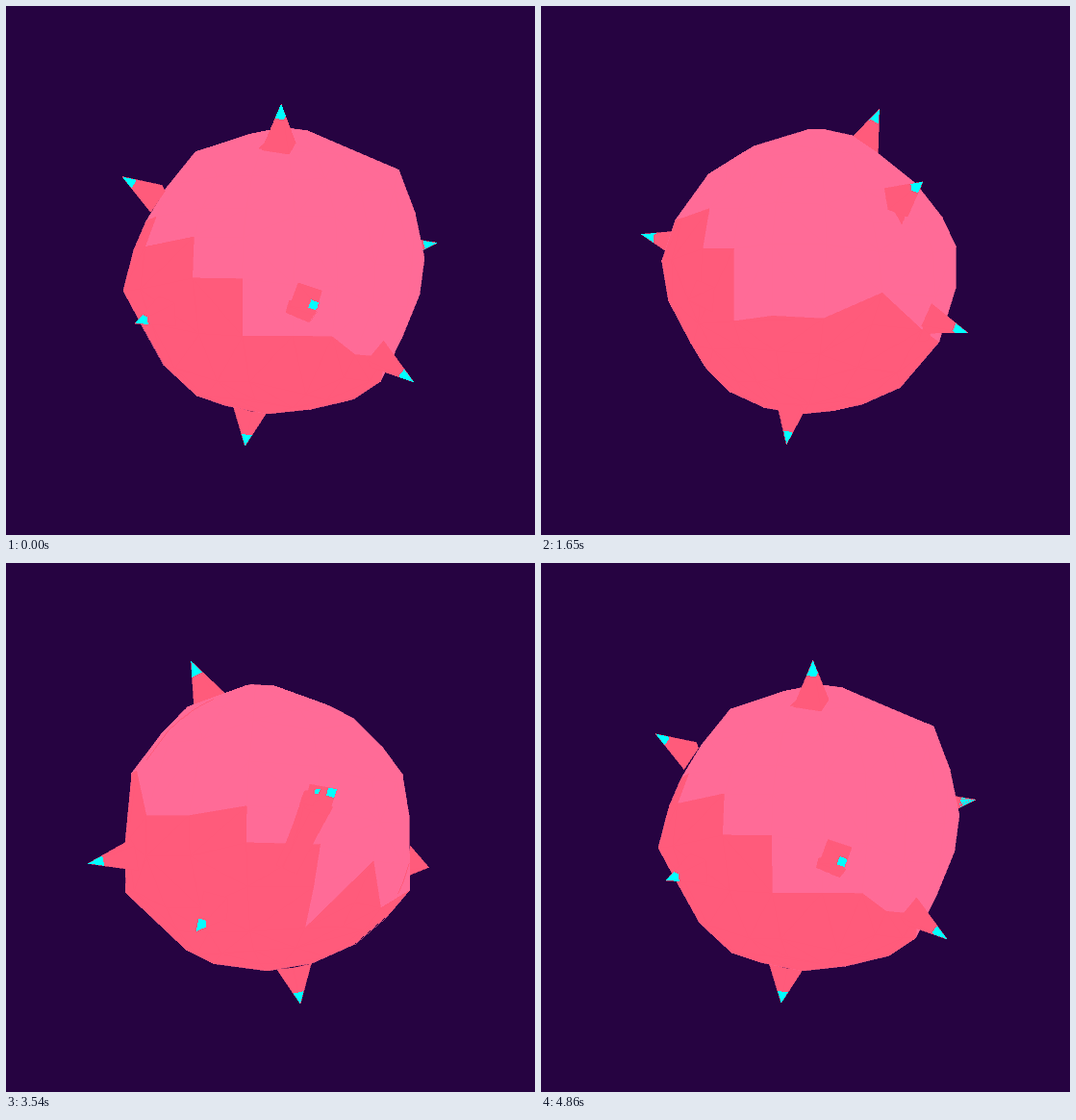
These frames come from a looping animation (550x550 px, 4890 ms). An HTML page:

```html
<!DOCTYPE html>
<html lang="en">
<head>
<meta charset="utf-8">
<title>Spiky ball</title>
<style>
html, body { margin: 0; width: 100%; height: 100%; overflow: hidden; background: #260341; }
svg { display: block; width: 100vw; height: 100vh; shape-rendering: crispEdges; }
.lit { fill: #ff6b97; stroke: #ff6b97; stroke-width: .6; }
.dark { fill: #ff5b7b; stroke: #ff5b7b; stroke-width: .6; }
.cap { fill: #0ff; }
</style>
</head>
<body>
<svg viewBox="0 0 550 550">
  <clipPath id="ball"><path id="clip"/></clipPath>
  <g id="back"></g>
  <path id="body" class="lit"/>
  <g clip-path="url(#ball)"><path id="shade" class="dark"/><path id="cast" class="dark"/></g>
  <g id="front"></g>
</svg>
<script>
const LOOP = 4890, STEP = 30, CX = 275.5, CY = 277;
const ROLL = .026, PITCH = .03, RAD = 148, BASE = 145;
const $ = id => document.getElementById(id);

const dot = (a, b) => a[0] * b[0] + a[1] * b[1] + a[2] * b[2];
const cross = (a, b) => [a[1] * b[2] - a[2] * b[1], a[2] * b[0] - a[0] * b[2], a[0] * b[1] - a[1] * b[0]];
const add = (a, b, k = 1) => a.map((v, i) => v + b[i] * k);
const mul = (a, k) => a.map(v => v * k);
const unit = a => mul(a, 1 / Math.hypot(...a));
const mix = (a, b, k) => a.map((v, i) => v + (b[i] - v) * k);
const normal = (a, b, c) => cross(add(b, a, -1), add(c, a, -1));
const polar = (deg, rho, h) => {
  const f = deg * Math.PI / 180;
  return [rho * Math.sin(f), h, rho * Math.cos(f)];
};
const LIGHT = unit([.5, 1, .24]);

// Outlines of the ball: azimuth, then pairs of distance from axis and height
const ribs = [
  [-170.6, 51,132, 82,118, 114,88, 135,61, 143,19, 146,-59, 125,-85, 90,-117, 46,-138],
  [-136.4, 29,138, 71,122, 104,95, 128,68, 140,25, 131,-50, 113,-86, 94,-113, 46,-135],
  [-90, 82,123, 111,85, 131,50, 143,20, 153,-23, 134,-56, 108,-100, 74,-130],
  [-31.5, 46,142, 112,95, 140,61, 155,31, 156,-12, 140,-69, 101,-117, 65,-134],
  [9.4, 25,148, 92,123, 118,93, 146,55, 151,-17, 149,-70, 85,-123, 57,-137],
  [43.6, 37,148, 97,122, 132,85, 157,8, 156,-34, 130,-86, 113,-110, 89,-133],
  [90, 81,127, 130,110, 148,66, 159,19, 155,-19, 138,-64, 117,-110, 90,-129, 45,-141],
  [148.5, 60,128, 88,109, 122,69, 137,51, 150,8, 142,-33, 118,-76, 102,-101, 64,-130]
].map(([az, ...v]) => {
  const pts = [[0, 149]];
  for (let i = 0; i < v.length; i += 2) pts.push([v[i], v[i + 1]]);
  pts.push([0, -147]);
  return { az, pts: pts.map(([rho, h]) => ({ rho, h, ang: Math.atan2(rho, h), r: Math.hypot(rho, h) })) };
});

function radiusAt(rib, ang) {
  const i = Math.max(1, rib.pts.findIndex(p => p.ang >= ang));
  const a = rib.pts[i - 1], b = rib.pts[i];
  return a.r + (b.r - a.r) * (ang - a.ang) / (b.ang - a.ang);
}

function ballPoints() {
  const out = [[0, 149, 0], [0, -147, 0]];
  ribs.forEach((rib, i) => {
    const next = ribs[(i + 1) % ribs.length];
    const gap = (next.az - rib.az + 360) % 360;
    for (const p of rib.pts.slice(1, -1)) {
      const r = (p.r + radiusAt(next, p.ang)) / 2 * 1.008;
      out.push(polar(rib.az, p.rho, p.h));
      out.push(polar(rib.az + gap / 2, r * Math.sin(p.ang), r * Math.cos(p.ang)));
    }
  });
  // Spread the order so that the first points are not in one plane
  const rank = i => (i * .618034) % 1;
  return out.map((p, i) => [rank(i), p]).sort((a, b) => a[0] - b[0]).map(e => e[1]);
}

function hull(pts) {
  let faces = [[0, 1, 2], [0, 2, 1]];
  for (let i = 3; i < pts.length; i++) {
    const keep = [], edges = new Map();
    for (const f of faces) {
      const [a, b, c] = f;
      const n = normal(pts[a], pts[b], pts[c]);
      if (dot(n, add(pts[i], pts[a], -1)) > 1e-6) {
        [[a, b], [b, c], [c, a]].forEach(e => edges.set(e.join(), e));
      } else keep.push(f);
    }
    for (const [a, b] of edges.values()) {
      if (!edges.has(b + "," + a)) keep.push([a, b, i]);
    }
    faces = keep;
  }
  return faces;
}

const points = ballPoints(), faces = hull(points);

// azimuth, distance from axis, height, base radius, has cap
const spikes = [
  [4, 88, 173, 21, 1],
  [-74.5, 163, 94, 19, 1],
  [115, 187, 38, 9, 1],
  [119.5, 197, 38, 19, 1],
  [15, 190, -41, 19, 1],
  [-51, 180, -60, 18, 1],
  [71.5, 160, -112, 19, 1],
  [-145, 39, -180, 18, 1],
  [-169, 165, -35, 19, 0]
].map(([az, rho, h, w, cap]) => {
  const tip = polar(az, rho, h), axis = unit(tip);
  const e1 = polar(az + 90, 1, 0), e2 = cross(axis, e1);
  const base = [0, 1, 2, 3].map(k => {
    const f = k * Math.PI / 2 + .5;
    return add(add(mul(axis, BASE), e1, w * Math.cos(f)), e2, w * Math.sin(f));
  });
  const g = document.createElementNS("http://www.w3.org/2000/svg", "g");
  const parts = ["dark", "cap"].map(c => {
    const p = document.createElementNS("http://www.w3.org/2000/svg", "path");
    p.setAttribute("class", c);
    return g.appendChild(p);
  });
  return { tip, base, w, cap, g, parts };
});

const path = list => "M" + list.map(p => (CX + p[0]).toFixed(1) + " " + (CY - p[1]).toFixed(1)).join("L") + "Z";

function viewer(theta) {
  const c = Math.cos(theta), s = Math.sin(theta);
  return ([px, h, pz]) => {
    const x = px * c + pz * s, z = pz * c - px * s;
    return [x + ROLL * h, h - ROLL * x + PITCH * z, z - PITCH * h];
  };
}

// Where the light ray through p lands on the ball
function land(p) {
  const s = dot(p, LIGHT), d2 = dot(p, p) - s * s;
  const hit = d2 < RAD * RAD
    ? add(p, LIGHT, Math.sqrt(RAD * RAD - d2) - s)
    : mul(unit(add(p, LIGHT, -s)), RAD);
  if (hit[2] >= 0) return hit;
  const k = RAD / Math.hypot(hit[0], hit[1]);
  return [hit[0] * k, hit[1] * k, hit[2]];
}

function castShadow(tip, w) {
  const axis = unit(tip);
  if (dot(axis, LIGHT) <= 0) return "";
  const side = mul(unit(cross(axis, LIGHT)), w * .85), root = mul(axis, RAD);
  const left = [], right = [];
  for (let k = 0; k <= 1; k += .125) {
    left.push(land(mix(add(root, side), tip, k)));
    right.unshift(land(mix(add(root, side, -1), tip, k)));
  }
  const ring = left.concat(right);
  return ring.some(p => p[2] > 0) ? path(ring) : "";
}

function draw(t) {
  const view = viewer(t / LOOP * 2 * Math.PI);
  const pts = points.map(view);
  let body = "", shade = "", cast = "";
  for (const f of faces) {
    const tri = f.map(i => pts[i]), n = normal(...tri);
    if (n[2] <= 0) continue;
    const d = path(tri);
    body += d;
    if (dot(n, LIGHT) < 0) shade += d;
  }
  for (const sp of spikes) {
    const tip = view(sp.tip), base = sp.base.map(view);
    let cone = "", cap = "";
    base.forEach((a, k) => {
      const b = base[(k + 1) % 4];
      if (normal(a, b, tip)[2] <= 0) return;
      cone += path([a, b, tip]);
      if (sp.cap) cap += path([mix(tip, a, .32), mix(tip, b, .32), tip]);
    });
    sp.parts[0].setAttribute("d", cone);
    sp.parts[1].setAttribute("d", cap);
    const layer = $(tip[2] > 0 ? "front" : "back");
    if (sp.g.parentNode !== layer) layer.appendChild(sp.g);
    cast += castShadow(tip, sp.w);
  }
  $("body").setAttribute("d", body);
  $("clip").setAttribute("d", body);
  $("shade").setAttribute("d", shade);
  $("cast").setAttribute("d", cast);
}

function tick() {
  draw(Math.floor(performance.now() % LOOP / STEP) * STEP);
  requestAnimationFrame(tick);
}
tick();
</script>
</body>
</html>
```
